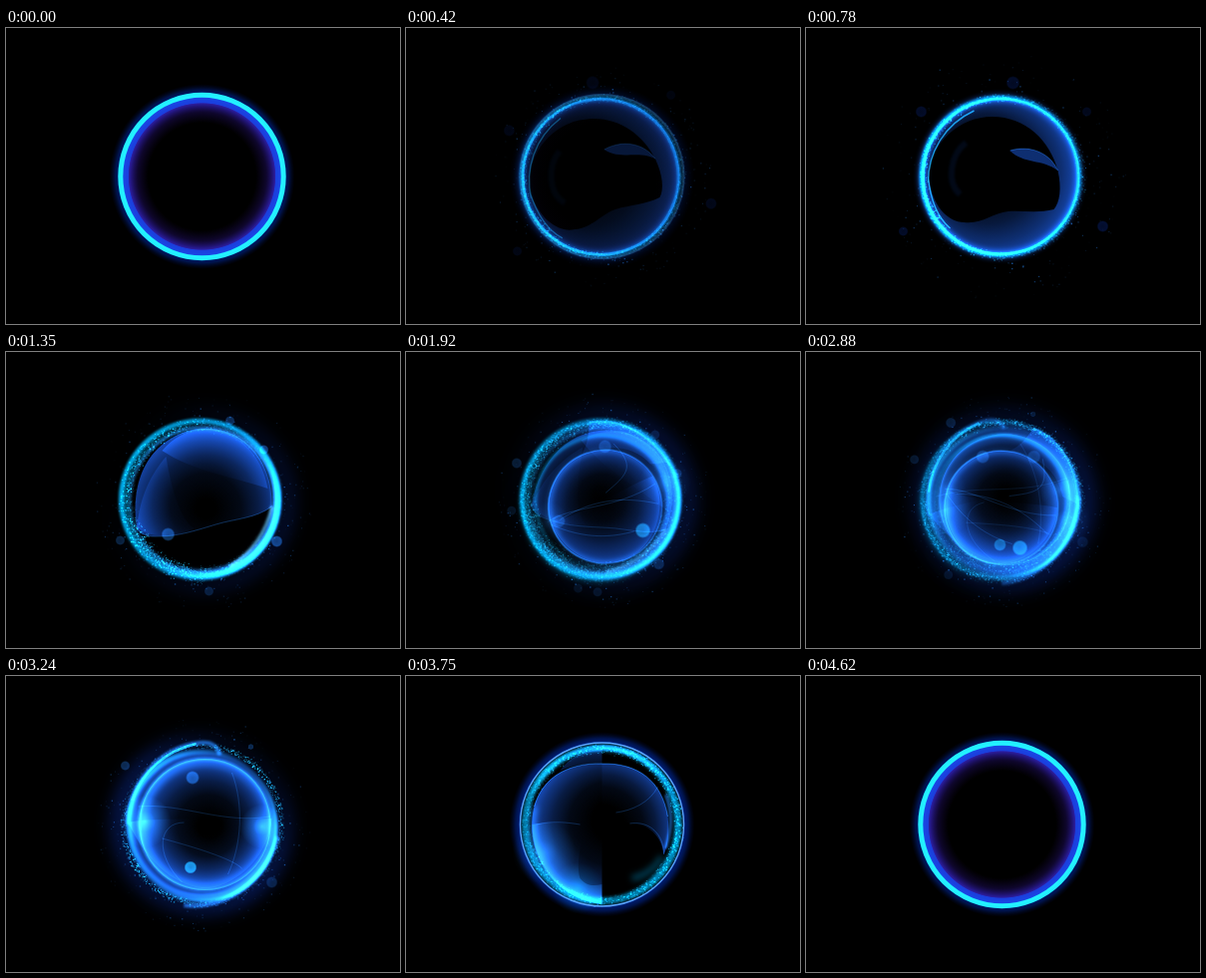
An HTML page with a canvas that plays this animation: 395x297 px, repeating every 4.71 s.

```html
<!DOCTYPE html>
<html>
<head>
<meta charset="utf-8">
<style>
html, body { margin: 0; width: 100%; height: 100%; overflow: hidden; background: #000; }
canvas { display: block; width: 100vw; height: 100vh; }
</style>
</head>
<body>
<canvas id="stage" width="395" height="297"></canvas>
<script>
const ctx = document.getElementById('stage').getContext('2d');
const LOOP = 4710, STEP = 30, LAST = 4620, TAU = Math.PI * 2;
const CX = 196.5, CY = 149;
const CYAN = '30,200,255', TEAL = '0,150,205', SKY = '40,140,255', BLUE = '28,92,225', DEEP = '10,44,150';

let seed = 7;
const rnd = () => (seed = (seed * 16807) % 2147483647) / 2147483647;
const rad = d => d * Math.PI / 180;
const ease = (a, b, t) => {
  const k = Math.min(1, Math.max(0, (t - a) / (b - a)));
  return k * k * (3 - 2 * k);
};
const lobe = (a, p) => Math.pow((1 + Math.cos(a)) / 2, p);

const grains = Array.from({ length: 1500 }, () => ({
  a: rnd() * TAU, d: rnd() + rnd() - 1, s: 0.5 + rnd() * 0.8, k: rnd()
}));
const sparks = Array.from({ length: 300 }, () => ({
  a: rnd() * TAU, d: Math.pow(rnd(), 1.8), s: 0.5 + rnd() * 0.9, k: rnd(), v: rnd() - 0.5
}));

function fade(g, rgb, stops) {
  for (const [at, a] of stops) g.addColorStop(at, `rgba(${rgb},${a})`);
  return g;
}

// Circle stroke that is brightest at angle `peak` (degrees).
function arc(x, y, r, w, rgb, peak, p, low, high, blur = 1) {
  const g = ctx.createConicGradient(rad(peak), x, y);
  const stops = [];
  for (let i = 0; i <= 24; i++) stops.push([i / 24, low + (high - low) * lobe(i / 24 * TAU, p)]);
  ctx.strokeStyle = fade(g, rgb, stops);
  ctx.lineWidth = w;
  ctx.filter = blur ? `blur(${blur}px)` : 'none';
  ctx.beginPath();
  ctx.arc(x, y, r, 0, TAU);
  ctx.stroke();
  ctx.filter = 'none';
}

// Translucent shape whose colour grows from a dark point to a rim.
function sheet(path, rgb, fx, fy, r0, x, y, r1, a) {
  ctx.fillStyle = fade(ctx.createRadialGradient(fx, fy, r0, x, y, r1), rgb,
    [[0, 0], [0.35, a * 0.1], [0.6, a * 0.32], [0.8, a * 0.6], [1, a]]);
  ctx.fill(path, 'evenodd');
}

function line(d, a, w = 0.8, rgb = SKY, blur = 0) {
  ctx.strokeStyle = `rgba(${rgb},${a})`;
  ctx.lineWidth = w;
  ctx.filter = blur ? `blur(${blur}px)` : 'none';
  ctx.stroke(new Path2D(d));
  ctx.filter = 'none';
}

function disc(x, y, r) {
  const p = new Path2D();
  p.arc(x, y, r, 0, TAU);
  return p;
}

function glow(x, y, r, rgb, a) {
  ctx.fillStyle = fade(ctx.createRadialGradient(x, y, 0, x, y, r), rgb, [[0, a], [0.4, a * 0.4], [1, 0]]);
  ctx.fill(disc(x, y, r));
}

function bokeh(rgb, ...spots) {
  for (const [x, y, r, a] of spots) {
    ctx.fillStyle = fade(ctx.createRadialGradient(x, y, 0, x, y, r), rgb, [[0, a * 0.8], [0.75, a], [1, 0]]);
    ctx.fill(disc(x, y, r));
  }
}

function dust(r, spread, peak, p, low, high, rgb = CYAN) {
  ctx.fillStyle = `rgb(${rgb})`;
  const base = ctx.globalAlpha;
  for (const g of grains) {
    const q = r + g.d * spread;
    ctx.globalAlpha = base * (low + (high - low) * lobe(g.a - rad(peak), p)) * g.k;
    ctx.fillRect(q * Math.cos(g.a), q * Math.sin(g.a), g.s, g.s);
  }
  ctx.globalAlpha = base;
}

const scenes = [
  { at: 780, draw() {
    const hole = 'M-74 0C-72 -34 -42 -60 -10 -60C24 -60 48 -36 56 -6C60 12 58 26 52 33' +
      'C36 37 22 34 6 35C-10 37 -20 48 -38 46C-54 46 -70 30 -74 0Z';
    const p = disc(-1, 0, 79);
    p.addPath(new Path2D(hole));
    sheet(p, BLUE, -30, -20, 10, -6, 0, 86, 0.85);
    sheet(new Path2D('M8 -26C28 -32 48 -24 56 -6C40 -18 22 -12 8 -26Z'), BLUE, 0, -26, 2, 30, -14, 32, 0.5);
    line('M8 -26C28 -32 48 -24 56 -6', 0.4);
    line('M-36 -34C-52 -22 -56 6 -42 18', 0.1, 6, BLUE, 1);
    arc(-1.5, 0, 78.5, 10, BLUE, 160, 1, 0.3, 0.5, 2);
    arc(-1.5, 0, 79, 5, TEAL, 180, 1, 0.65, 1, 0.8);
    arc(-1.5, 0, 78, 3, CYAN, 165, 1.5, 0.2, 0.8, 0.7);
    line('M-74 6C-74 -24 -58 -52 -28 -66M-74 0C-72 22 -66 40 -52 52', 0.65, 1.4, CYAN, 0.4);
    dust(79, 5, 170, 1, 0.3, 0.8);
    bokeh(DEEP, [-81, -65, 6, 0.28], [11, -94, 7, 0.28], [101, 50, 6, 0.35], [-99, 55, 5, 0.28], [85, -65, 5, 0.2]);
  } },
  { at: 1350, draw() {
    const p = new Path2D('M-65 28C-72 -10 -60 -62 -4 -72C46 -76 72 -34 70 6' +
      'C54 18 34 18 14 24C-6 30 -24 36 -42 36C-52 36 -60 36 -65 28Z');
    sheet(p, BLUE, 4, 8, 10, 3, 8, 82, 0.95);
    sheet(new Path2D('M-40 -50C-10 -30 30 -24 66 -12C60 -50 30 -74 0 -72C-16 -70 -30 -62 -40 -50Z'),
      BLUE, 0, -10, 6, 10, -10, 66, 0.4);
    sheet(new Path2D('M-65 26C-62 -6 -50 -28 -36 -44C-30 -6 -20 20 -8 28C-28 38 -56 38 -65 26Z'),
      BLUE, 0, 0, 10, -10, 0, 66, 0.35);
    line('M-65 28C-60 38 -46 36 -42 36C-24 36 -6 30 14 24C34 18 54 18 70 6', 0.4);
    arc(0, 0, 86, 10, DEEP, 20, 1, 0, 0.5, 9);
    arc(1, 0, 73, 3, SKY, 290, 1, 0.1, 0.6);
    arc(-2, -1, 79, 5, TEAL, 270, 1, 0.5, 0.85);
    arc(-3, 0, 75, 11, TEAL, 180, 2, 0, 0.45, 1.5);
    arc(0, -1, 75, 9, SKY, 35, 2, 0, 1, 1.5);
    arc(0, -1, 76, 5, CYAN, 45, 3, 0, 0.8, 1);
    line('M28 66C50 52 64 32 70 6', 0.6, 3, '110,210,255', 1);
    dust(76, 8, 180, 1.5, 0.05, 1);
    dust(71, 8, 115, 5, 0, 0.9);
    bokeh(SKY, [-34, 34, 7, 0.4], [75, 41, 6, 0.45], [-82, 40, 5, 0.25], [7, 91, 5, 0.2], [62, -51, 5, 0.4], [28, -80, 5, 0.3]);
  } },
  { at: 2490, draw() {
    const x = 1, y = 7;
    arc(0, 0, 85, 16, DEEP, 340, 1, 0, 0.75, 10);
    sheet(disc(x, y, 57), BLUE, 0, -8, 6, x, y, 57, 0.95);
    sheet(new Path2D('M-56 2C-30 10 30 -6 56 -6C62 30 32 64 0 64C-34 62 -54 34 -56 2Z'),
      BLUE, 0, -6, 6, 0, 6, 62, 0.6);
    line('M-58 2C-30 -6 10 14 56 2M-56 6C-30 30 -6 38 20 40M-46 4C-10 -4 20 2 52 22M30 -50C44 -20 32 -16 6 -6', 0.45);
    arc(x, y, 56, 5, SKY, 190, 1, 0.2, 0.55, 2);
    arc(x, y, 57, 1.5, SKY, 200, 1, 0.4, 0.8, 0.6);
    arc(2, 1, 66, 8, SKY, 20, 1.5, 0.05, 0.8, 2);
    arc(-1, 1, 66, 4, TEAL, 235, 2, 0.15, 0.8);
    arc(-2, 2, 76, 12, TEAL, 150, 3, 0, 0.5, 2);
    arc(-1, 0, 79, 4, TEAL, 175, 1.2, 0.1, 0.9, 1);
    arc(-1, 0, 73, 14, BLUE, 350, 2, 0, 0.9, 1.5);
    arc(0, 0, 77, 3.5, CYAN, 0, 2.2, 0, 0.9);
    sheet(new Path2D('M14 -78C44 -74 68 -48 74 -14L58 -18C48 -42 24 -52 -4 -50C6 -58 10 -68 14 -78Z'),
      BLUE, 0, 0, 20, 0, 0, 80, 0.85);
    line('M14 -78C44 -74 68 -48 76 -10', 0.6, 2, SKY, 0.7);
    glow(66, 4, 26, SKY, 0.7);
    glow(-57, 2, 20, SKY, 0.45);
    dust(78, 6, 235, 1, 0.1, 0.8);
    dust(69, 9, 80, 3, 0, 0.8);
    bokeh(CYAN, [28.5, 42, 8, 0.85]);
    bokeh(SKY, [-68, -64, 5.5, 0.4], [21, -50, 7, 0.4], [-35, 85, 5, 0.25]);
  } },
  { at: 3240, draw() {
    arc(0, 0, 82, 14, DEEP, 200, 2, 0, 0.7, 9);
    arc(0, 0, 82, 14, DEEP, 50, 2, 0, 0.7, 9);
    sheet(disc(3, 0, 66), BLUE, 8, 2, 12, 3, 0, 66, 0.95);
    sheet(new Path2D('M-74 -2C-50 -8 30 -4 70 -6C66 40 24 66 0 64C-30 60 -56 36 -74 -2Z'),
      BLUE, 6, -4, 14, 2, 0, 74, 0.45);
    line('M-64 -18C-20 -22 20 0 68 -8M-18 -2C-44 -2 -48 30 -20 58M30 -52C42 -20 40 20 26 50M-40 14C-10 22 30 34 40 44', 0.25);
    arc(2, 0, 62, 7, SKY, 180, 1, 0.1, 0.45, 3);
    arc(3, 0, 66, 2.5, SKY, 200, 1, 0.35, 0.85);
    arc(0, 0, 70, 8, BLUE, 180, 0.7, 0.3, 0.9, 2);
    arc(0, 0, 73, 5, CYAN, 205, 3, 0, 0.7, 1.2);
    arc(0, 2, 72, 8, SKY, 45, 3, 0, 0.95, 1.5);
    arc(0, 2, 74, 3, CYAN, 40, 4, 0, 0.8, 1);
    line('M-75 0C-72 -46 -40 -78 -2 -82C10 -83 16 -78 18 -70', 0.65, 4, SKY, 0.9);
    line('M-70 -24C-60 -54 -36 -74 -6 -81', 0.6, 2.5, CYAN, 0.7);
    line('M-18 81C24 86 62 58 76 12', 0.65, 4, SKY, 1);
    glow(-57, -3, 26, SKY, 0.9);
    glow(60, 2, 22, SKY, 0.85);
    dust(79, 3.5, 320, 4, 0, 0.9);
    dust(79, 4, 140, 4, 0, 0.9);
    bokeh(CYAN, [-11.5, 43, 6.5, 0.6]);
    bokeh(SKY, [-9.5, -47, 7, 0.45], [-77, -59, 5, 0.3], [70, 58, 6, 0.2], [49, -78, 3, 0.3]);
  } },
  { at: 3750, draw() {
    const left = 'M0 -61C-36 -62 -60 -46 -68 -18C-78 22 -56 72 0 80Z';
    sheet(new Path2D(left), BLUE, 12, -4, 22, 4, 4, 80, 0.95);
    sheet(new Path2D('M0 80C-40 76 -70 40 -70 0C-50 -4 -34 0 -24 0C-14 4 -28 34 -22 54C-16 62 -8 62 0 60Z'),
      SKY, 10, -10, 42, 6, -6, 92, 0.75);
    sheet(new Path2D('M0 -61C36 -62 60 -44 66 -8C68 10 66 22 62 30C60 10 44 -2 28 -1C20 -4 8 -8 0 -12Z'),
      BLUE, 0, 4, 24, 0, 4, 74, 0.85);
    line('M0 -61C-36 -62 -60 -46 -68 -18M0 -61C36 -62 60 -44 66 -8', 0.5, 1);
    line('M28 -1C48 -4 62 10 62 30M-66 0C-50 -4 -34 -2 -22 0M56 -38C48 -22 30 -14 14 -12', 0.3);
    line('M-68 -18C-76 20 -58 64 -10 78', 0.5, 6, SKY, 3);
    line('M64 -30C71 -10 70 4 64 24', 0.6, 3, SKY, 1);
    sheet(new Path2D('M0 -76C-20 -74 -34 -66 -42 -54C-28 -60 -12 -62 0 -61Z'), BLUE, 0, 0, 30, 0, 0, 84, 0.6);
    arc(0, 0, 77, 7, TEAL, 170, 0.7, 0.3, 0.75, 1.5);
    arc(0, 0, 76, 7, TEAL, 0, 2, 0, 0.6, 1.5);
    arc(0, 0, 77, 5, SKY, 285, 10, 0, 0.9, 1.2);
    arc(0, 0, 77, 5, CYAN, 225, 30, 0, 0.5, 1.5);
    glow(-58, 28, 32, SKY, 0.35);
    glow(-24, 64, 26, TEAL, 0.4);
    line('M30 54C42 52 54 44 60 32', 0.4, 6, TEAL, 3);
    dust(76, 6, 0, 0.8, 0.4, 0.75);
  } }
];

function weight(i, t) {
  const from = i ? scenes[i - 1].at : 60;
  const to = i < scenes.length - 1 ? scenes[i + 1].at : 4380;
  const at = scenes[i].at;
  return t < at ? ease(from, at, t) : 1 - ease(at, to, t);
}

function drawSparks(t) {
  const a = ease(0, 500, t) * (1 - ease(3350, 3720, t));
  if (!a) return;
  const reach = 45 - 17 * ease(900, 1500, t);
  ctx.fillStyle = `rgb(${SKY})`;
  for (const s of sparks) {
    const ang = s.a + t * 0.0003 * (1 + s.v);
    const r = 80 + s.d * reach * ease(-200, 800, t);
    ctx.globalAlpha = a * 0.75 * s.k * (1 - s.d * 0.6) * (0.7 + 0.3 * Math.sin(t / 180 + s.a * 9));
    ctx.fillRect(CX + r * Math.cos(ang), CY + r * Math.sin(ang), s.s, s.s);
  }
}

function drawRing(t) {
  const out = 1 - ease(30, 600, t);
  const back = ease(3380, 3750, t);
  const full = Math.max(out, ease(3760, 4530, t));
  const a = Math.max(out, back);
  if (!a) return;
  const band = (r0, r1, stops) => {
    const g = ctx.createRadialGradient(0, 0, r0, 0, 0, r1);
    for (const [at, c] of stops) g.addColorStop(at, `rgba(${c})`);
    ctx.fillStyle = g;
    ctx.beginPath();
    ctx.arc(0, 0, r1, 0, TAU);
    ctx.arc(0, 0, r0, 0, TAU, true);
    ctx.fill();
  };
  ctx.save();
  ctx.translate(CX, CY);
  ctx.globalAlpha = a;
  band(82, 93, [[0, '0,44,170,.75'], [0.45, '0,30,120,.6'], [1, '0,10,60,0']]);
  ctx.globalAlpha = a * full;
  band(54, 80, [[0, '30,10,90,0'], [0.4, '36,16,110,.4'], [0.74, '48,32,175,.9'], [0.77, '26,62,220,1'], [1, '26,70,230,1']]);
  ctx.globalAlpha = a;
  ctx.globalCompositeOperation = 'source-over';
  ctx.strokeStyle = `rgb(${90 - 55 * full},${165 + 75 * full},255)`;
  ctx.lineWidth = 1.4 + 3.6 * full;
  ctx.beginPath();
  ctx.arc(0, 0, 82 - 0.3 * full, 0, TAU);
  ctx.stroke();
  ctx.restore();
}

function frame() {
  const now = performance.now() % LOOP;
  const t = Math.min(LAST, Math.floor(now / STEP) * STEP);
  ctx.globalAlpha = 1;
  ctx.globalCompositeOperation = 'source-over';
  ctx.fillStyle = '#000';
  ctx.fillRect(0, 0, 395, 297);
  ctx.globalCompositeOperation = 'lighter';
  drawSparks(t);
  scenes.forEach((s, i) => {
    const w = weight(i, t);
    if (w < 0.004) return;
    ctx.save();
    ctx.translate(CX, CY);
    ctx.rotate((t - s.at) * 0.0006);
    ctx.globalAlpha = w;
    s.draw();
    ctx.restore();
  });
  drawRing(t);
  requestAnimationFrame(frame);
}
frame();
</script>
</body>
</html>
```
